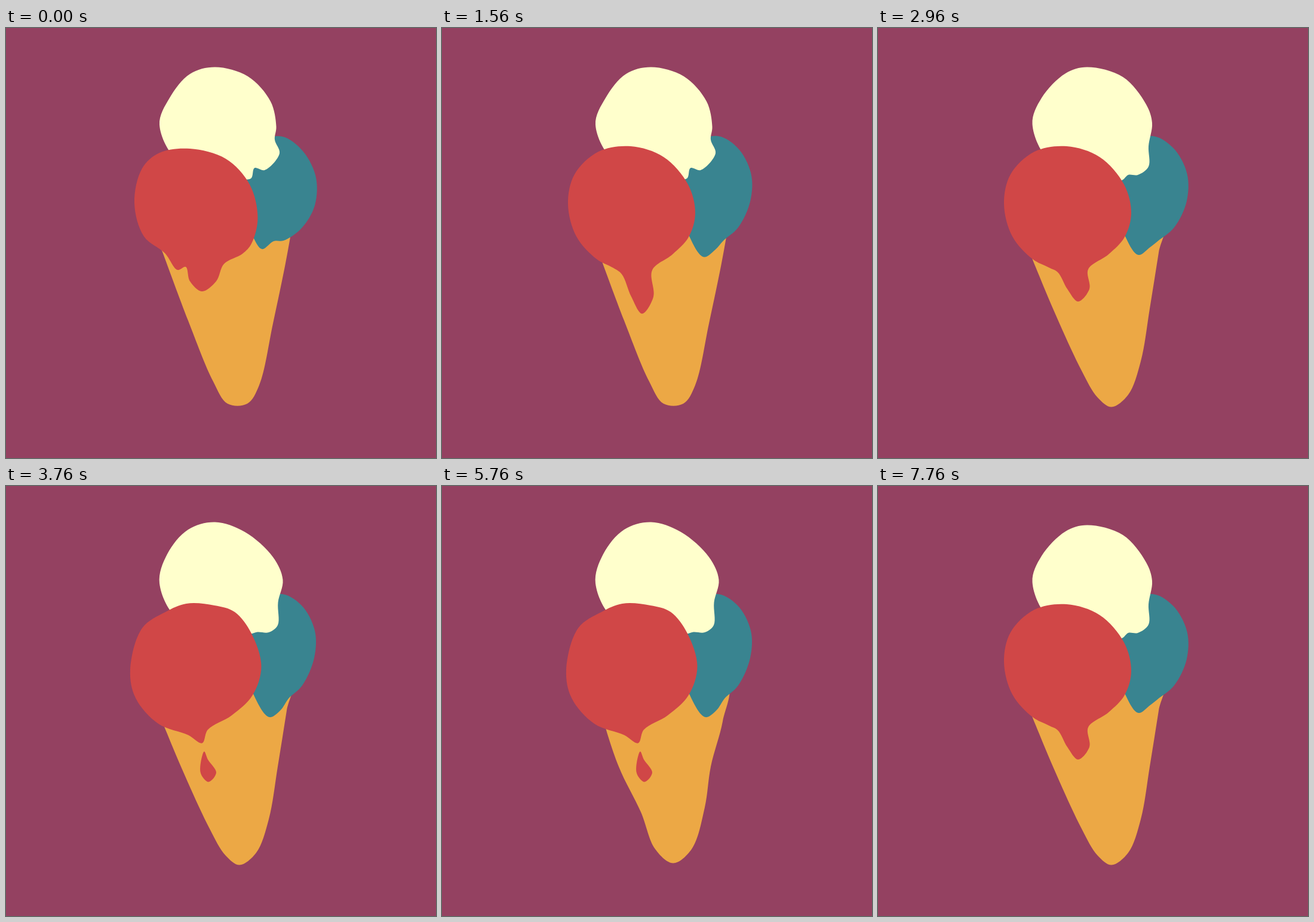
These frames come from a looping animation (720x720 px, 7.8 s). An HTML page with a canvas:

```html
<!DOCTYPE html>
<html lang="en">
<head>
<meta charset="utf-8">
<title>Melting ice cream</title>
<style>
html, body { margin: 0; height: 100%; overflow: hidden; background: #944161; }
canvas { display: block; }
</style>
</head>
<body>
<canvas id="stage" width="720" height="720"></canvas>
<script>
const LOOP = 7800, STEP = 200, LEAD = 40;
const ctx = document.getElementById('stage').getContext('2d');

// Key points, written "x y, x y, ..."
const keys = text => text.split(',').map(p => p.split(' ').map(Number));
const mix = (a, b, k) => a.map((p, i) => p.map((v, j) => v + (b[i][j] - v) * k));
// Lengthens or shortens everything that hangs below y = 400
const hang = (points, k) => points.map(([x, y]) => [x, y + Math.max(0, y - 400) * (k - 1)]);

// Closed centripetal Catmull-Rom curve through the key points
function trace(path, points) {
  const at = i => points[(i + points.length) % points.length];
  const gap = (a, b) => Math.sqrt(Math.hypot(a[0] - b[0], a[1] - b[1]));
  const handle = (prev, p, next) => {
    const d = gap(prev, p), e = gap(p, next);
    return p.map((v, j) =>
      (d * d * next[j] - e * e * prev[j] + (2 * d * d + 3 * d * e + e * e) * v) / (3 * d * (d + e)));
  };
  path.moveTo(...points[0]);
  points.forEach((p, i) => {
    const next = at(i + 1);
    path.bezierCurveTo(...handle(at(i - 1), p, next), ...handle(at(i + 2), next, p), ...next);
  });
  path.closePath();
}

function shape(...outlines) {
  const path = new Path2D();
  outlines.forEach(points => trace(path, points));
  return path;
}

const coneStraight = keys('262 375,305 490,347 592,371 629,404 629,424 598,447 495,468 394,477 345,482 318,250 343');
const coneWavy = keys('266 375,296 470,333 546,357 608,387 631.5,418 608,440 538,450 470,470 394,477 330,262 345');
const conePointed = keys('253 367,270 415,340 572,368 619,391 634.5,419 614,440 558,455 470,470 376,478 325,255 340');

const blueSoft = keys('456 181,493 201,518 246,517 295,495 335,466 356,450 360,431 373,415 352,380 220');
const blueDrip = keys('457 180.5,494 199,517 242,516 288,496 334,473 356,460 375,441 387,414 348,380 220');

const creamRest = keys('290 225,257 162,274 117,308 77,350 65.5,405 81,443 123,452.5 165,450 187,458 210,433 238,416 234.5,410 252,380 250');
const creamSoft = keys('290 225,258.5 161,274 117,314 76,350 65.5,410 82,449 128,459 159,453 198,453 232,435 246,419 246,408 255,380 250');
const creamSag = keys('290 225,257 163,270 114,305 73,350 60.5,400 77,447 119,463.5 157,455.5 195,455 233,440 245,421 244.5,408 248,380 245');

const redRest = keys('308 202,368 219,408 262,421.5 318,411 361,396 378,365 395,352 424,328 441,308 424,301 400,287 405,266 377,231 349,215 293,228 235,257 209');
const redSoft = keys('302 199,364 215,409 257,423 304,415 352,395 381,357 394,347.5 424,328 450,309 431,301 398,284 407.5,267 377,232 348,216 296,223 248,255 209');
const redSag = keys('316 198,371 216,412 262,424 310,413 350,386 379,352 404,354 437,335 458,317 437,301 409,286 401,259 387,225 349,211 295,222 245,262 207');
const redSplit = keys('302 197,349 200,383 211,411 247,427.5 302,413 350,378 384,338 408,328.5 430.5,305 417,255 398,217 355,208 308,228 238,267 211');
const drop = keys('332 444.5,338 458,352 480,339 495.5,326 481,329 450');

const cycle = (poses, n) => poses[n % poses.length];
const pingPong = (poses, n) => {
  const last = poses.length - 1, k = n % (2 * last);
  return poses[Math.min(k, 2 * last - k)];
};

// Back to front
const layers = [
  { color: '#eca845', order: cycle, poses: [
    shape(coneStraight), shape(coneWavy), shape(mix(coneWavy, conePointed, .5)), shape(conePointed)] },
  { color: '#398490', order: pingPong, poses:
    [-.2, 0, .25, .5, .75, 1, 1.25].map(k => shape(mix(blueSoft, blueDrip, k))) },
  { color: '#ffffcc', order: pingPong, poses: [
    shape(creamRest), ...[0, .5, 1, 1.75].map(k => shape(mix(creamSoft, creamSag, k)))] },
  { color: '#d04747', order: pingPong, poses: [
    shape(redRest), ...[0, .5, 1].map(k => shape(mix(redSoft, redSag, k))),
    shape(hang(redSag, 1.35)),
    shape(redSplit, drop),
    shape(hang(redSplit, .6), drop.map(([x, y]) => [x, y + 36]))] }
];

function draw(now) {
  const n = Math.floor((now % LOOP + LEAD) / STEP);
  ctx.fillStyle = '#944161';
  ctx.fillRect(0, 0, 720, 720);
  for (const { color, order, poses } of layers) {
    ctx.fillStyle = color;
    ctx.fill(order(poses, n));
  }
  requestAnimationFrame(draw);
}
draw(0);
</script>
</body>
</html>
```
